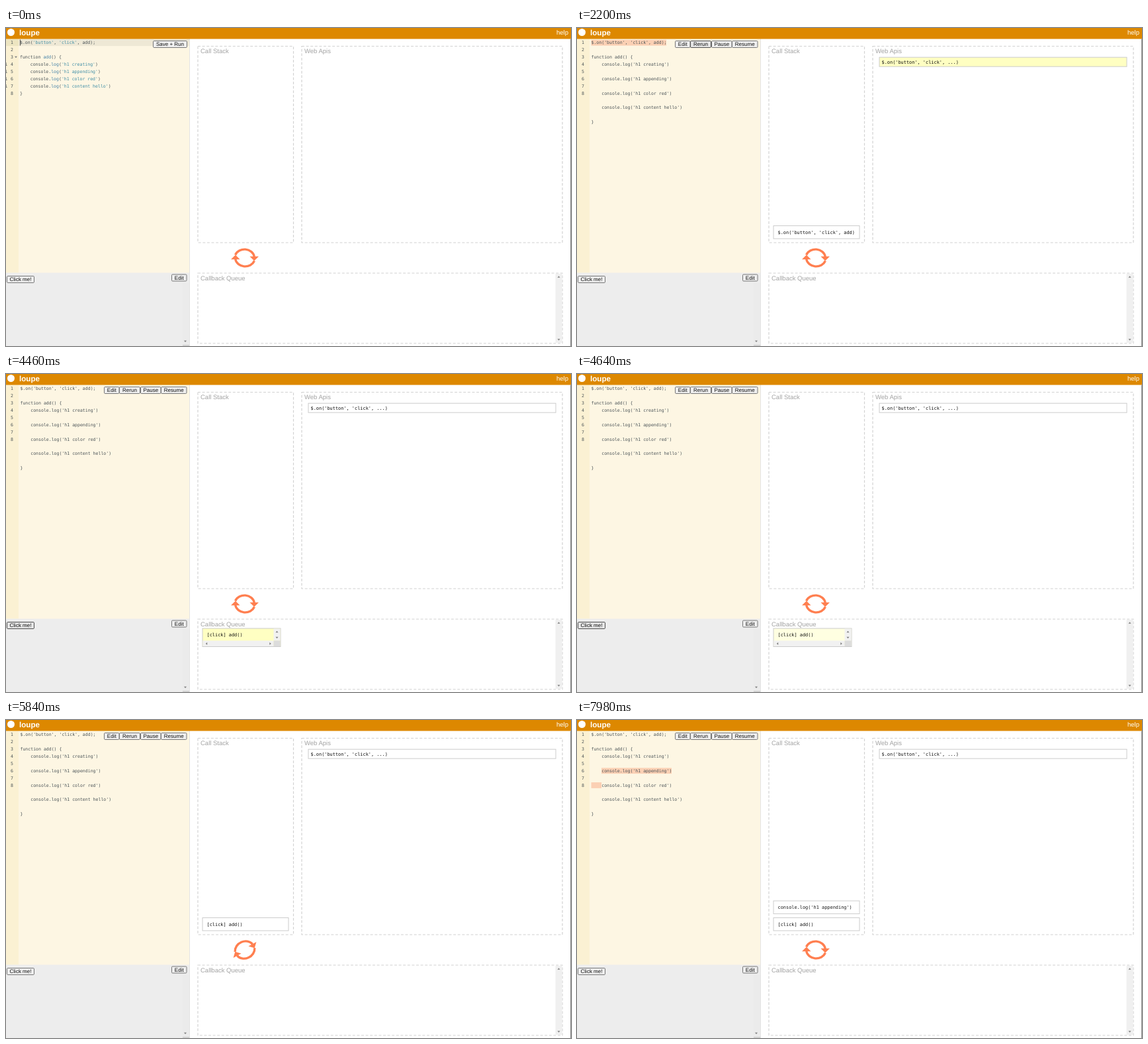
An HTML page for the animation above (8000 ms loop, 854x480 px).

```html
<!DOCTYPE html>
<html lang="en">
<head>
<meta charset="utf-8">
<style>
  html, body { margin: 0; width: 100%; height: 100%; overflow: hidden; background: #fff; }
  svg { display: block; width: 854px; height: 480px; }
  text { white-space: pre; text-rendering: geometricPrecision; font-family: "Liberation Sans", Arial, sans-serif; }
  .code { font: 6.54px "DejaVu Sans Mono", monospace; fill: #4c5558; }
  .item { font: 6.92px "DejaVu Sans Mono", monospace; fill: #111; }
  .label { font-size: 9.5px; fill: #a3a3a3; }
  .button { font-size: 8px; fill: #111; }
  .arrow { fill: #808080; }
  .key { fill: #4583a8; }
  .str { fill: #3f8ea6; }
  .dash { fill: none; stroke: #d2d2d2; stroke-dasharray: 4 2.6; stroke-width: 1.2; }
</style>
</head>
<body>
<svg id="stage" viewBox="0 0 854 480"></svg>
<script>
const LOOP = 8000;
const FADE = 170;
const stage = document.getElementById('stage');

const rect = (x, y, w, h, fill, extra = '') =>
  `<rect x="${x}" y="${y}" width="${w}" height="${h}" fill="${fill}" ${extra}/>`;
const text = (x, y, cls, content, extra = '') =>
  `<text x="${x}" y="${y}" class="${cls}" ${extra}>${content}</text>`;
const group = (id, content) => `<g id="${id}">${content}</g>`;
const arrow = (x, y, angle) =>
  `<path class="arrow" d="M-2 1.2H2L0 -1.3z" transform="translate(${x} ${y}) rotate(${angle})"/>`;
const row = n => 24.3 + n * 10.9;

const button = (id, x, y, w, label) => group(id,
  rect(x + .5, y + .5, w - 1, 10, '#efefef', 'stroke="#767676" rx="1.3"') +
  text(x + w / 2, y + 8.3, 'button', label, 'text-anchor="middle"'));

const panel = (x, y, w, h, label) =>
  rect(x, y, w, h, 'none', 'class="dash"') + text(x + 4, y + 10.5, 'label', label);

const stackItem = (id, y, label) => group(id,
  rect(297, y, 130, 19.5, '#fff', 'stroke="#ccc"') + text(303.5, y + 12.3, 'item', label));

const mark = (id, x, n, w) => rect(x, row(n) - 6.5, w, 8.8, '#fbd0b4', `class="${id}"`);

const logs = ['creating', 'appending', 'color red', 'content hello'];
const str = s => `<tspan class="str">'${s}'</tspan>`;
const key = s => `<tspan class="key">${s}</tspan>`;

const gutter = rect(0, 16, 19, 353.5, '#fbf1d3');
const lineNumbers = Array.from({ length: 8 }, (_, i) =>
  text(11, row(i), 'code', i + 1, 'text-anchor="end"')).join('');

const editing = group('editing',
  rect(0, 16.5, 19, 10.7, '#ede5c1') + rect(19, 16.5, 258, 10.7, '#eee8d5') +
  text(21, row(0), 'code', `$.on(${str('button')}, ${str('click')}, add);`) +
  rect(21, 17.5, .8, 9, '#222') +
  text(21, row(2), 'code', `function ${key('add')}() {`) +
  logs.map((s, i) =>
    text(21, row(3 + i), 'code', `    console.${key('log')}(${str('h1 ' + s)})`) +
    text(-1.5, row(3 + i), 'code', 'i', 'font-weight="bold"')).join('') +
  text(21, row(7), 'code', '}') +
  arrow(15, 44, 180) +
  button('save', 222, 19, 52, 'Save + Run'));

const running = group('running',
  mark('markOn', 21.5, 0, 113.5) +
  mark('markCreate', 37, 3, 102) + mark('markCreate', 21.5, 5, 15.5) +
  mark('markAppend', 37, 5, 106) + mark('markAppend', 21.5, 7, 15.5) +
  text(21.5, row(0), 'code', "$.on('button', 'click', add);") +
  text(21.5, row(2), 'code', 'function add() {') +
  logs.map((s, i) => text(21.5, row(3 + 2 * i), 'code', `    console.log('h1 ${s}')`)).join('') +
  text(21.5, row(11), 'code', '}') +
  button('edit', 148, 19, 23.5, 'Edit') + button('rerun', 171, 19, 32, 'Rerun') +
  button('pause', 203, 19, 31.5, 'Pause') + button('resume', 234, 19, 39.5, 'Resume'));

const loopArrow =
  `<path d="M-14.4 -4.5A15 13.3 0 0 1 14.3 -2" fill="none" stroke="#ff7f50" stroke-width="3.4"/>
   <path d="M7.4 -2.2H21L14.2 4.6z" fill="#ff7f50"/>`;

stage.innerHTML =
  rect(0, 16, 277, 354, '#fdf6e3') + gutter + editing + running + lineNumbers +
  rect(0, 369.5, 277, 110.5, '#ededed') +
  rect(267, 385, 10, 92, '#ebebeb') + rect(267, 478, 10, 2, '#d4d4d4') + arrow(271, 473, 180) +
  rect(277, 16, 1, 464, '#e4e4e4') +
  button('outputEdit', 250, 371.5, 23.5, 'Edit') + button('clickMe', 1, 374, 42, 'Click me!') +
  rect(0, 0, 854, 16.5, '#dd8800') +
  '<circle cx="7.5" cy="6.5" r="5.5" fill="#fff"/>' +
  text(20, 11, '', 'loupe', 'font-size="11.6" font-weight="bold" fill="#fff"') +
  text(832, 10, '', 'help', 'font-size="9.5" fill="#fff"') +
  rect(853, 16.5, 1, 463.5, '#888') +
  panel(290, 27.5, 144.5, 296.5, 'Call Stack') +
  panel(447, 27.5, 394, 296.5, 'Web Apis') +
  panel(290, 370, 551, 106, 'Callback Queue') +
  rect(830.5, 371, 10, 104, '#f0f0f0') + arrow(835.5, 375.5, 0) + arrow(835.5, 470.5, 180) +
  stackItem('stackOn', 298.5, "$.on('button', 'click', add)") +
  stackItem('stackClick', 298.5, '[click] add()') +
  stackItem('stackCreate', 273, "console.log('h1 creating')") +
  stackItem('stackAppend', 273, "console.log('h1 appending')") +
  group('webApi', rect(457, 44.2, 374, 14, '#fff', 'stroke="#ccc"') +
    text(460.5, 53.5, 'item', "$.on('button', 'click', ...)")) +
  group('callback', rect(297, 384, 118, 27.5, '#fff', 'stroke="#ccc"') +
    rect(404.5, 384.5, 10, 18, '#f1f1f1') + rect(297.5, 402.5, 107, 8.5, '#f1f1f1') +
    rect(404.5, 402.5, 10, 8.5, '#dcdcdc') +
    arrow(409.5, 389, 0) + arrow(409.5, 398, 180) + arrow(303, 407, -90) + arrow(399.5, 407, 90) +
    text(303.5, 396, 'item', '[click] add()')) +
  group('spinner', loopArrow + `<g transform="rotate(180)">${loopArrow}</g>`);

const $ = id => document.getElementById(id);
const progress = (t, start, end) => Math.max(0, Math.min(1, (t - start) / (end - start)));
const within = (t, start, end) => t >= start && t < end;
const show = (element, visible) => { element.style.display = visible ? '' : 'none'; };
const yellow = amount => `rgb(255,255,${Math.round(255 - 61 * amount)})`;

// Each stack item shares its span with the code it highlights.
const calls = [
  { item: 'stackOn', mark: 'markOn', start: 1440, end: 2220 },
  { item: 'stackClick', start: 5400, end: LOOP },
  { item: 'stackCreate', mark: 'markCreate', start: 6180, end: 6980 },
  { item: 'stackAppend', mark: 'markAppend', start: 7820, end: LOOP },
];
const hovers = {
  save: [[1060, 1200]],
  resume: [[1300, 1780], [2780, 2820]],
  rerun: [[2060, 2780]],
  clickMe: [[3840, 4180], [4400, 4660]],
};
const presses = { save: [1200, 1300], clickMe: [4180, 4400] };

function render(t) {
  show($('editing'), t < 1300);
  show($('running'), t >= 1300);

  for (const { item, mark, start, end } of calls) {
    $(item).style.opacity = progress(t, start - 20, start + FADE) * (1 - progress(t, end, end + FADE));
    document.querySelectorAll('.' + mark).forEach(e => show(e, within(t, start, end)));
  }
  for (const [id, spans] of Object.entries(hovers)) {
    const pressed = presses[id] && within(t, ...presses[id]);
    const hovered = spans.some(span => within(t, ...span));
    const box = $(id).firstChild;
    box.setAttribute('fill', pressed ? '#f5f5f5' : hovered ? '#e5e5e5' : '#efefef');
    box.setAttribute('stroke', pressed ? '#8d8d8d' : hovered ? '#4f4f4f' : '#767676');
  }

  show($('webApi'), t >= 2200);
  const apiFlash = within(t, 4400, 4460) ? 1 : 1 - progress(t, 2220, 2460);
  $('webApi').firstChild.setAttribute('fill', yellow(apiFlash));

  show($('callback'), within(t, 4460, 5540));
  $('callback').style.opacity = 1 - progress(t, 5360, 5360 + FADE);
  $('callback').firstChild.setAttribute('fill', yellow(1 - progress(t, 4520, 4760)));

  const spin = 180 * progress(t, 5420, 5920);
  $('spinner').setAttribute('transform', `translate(361 347) rotate(${spin})`);
}

const begin = performance.now();
function tick() {
  render((performance.now() - begin) % LOOP);
  requestAnimationFrame(tick);
}
tick();
</script>
</body>
</html>
```
